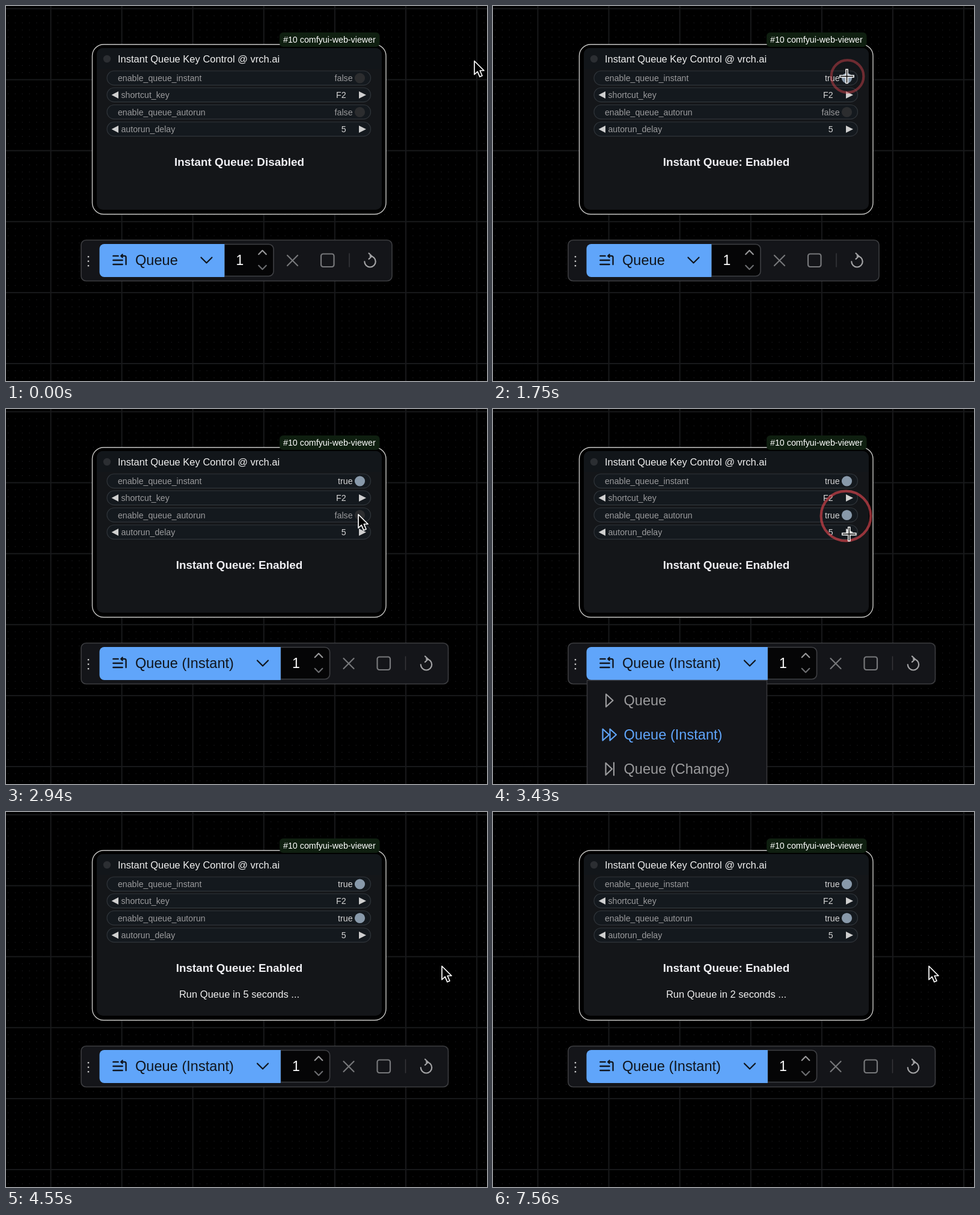
Recreate the animation shown at these times as an HTML page with a canvas. Size 800 px wide and 624 px high, loop 8000 ms.

```html
<!DOCTYPE html>
<html lang="en">
<head>
<meta charset="utf-8">
<title>Instant queue control</title>
<style>
html, body { margin: 0; width: 100%; height: 100%; overflow: hidden; background: #000; }
canvas { display: block; width: 100vw; height: 100vh; }
</style>
</head>
<body>
<canvas id="stage" width="800" height="624"></canvas>
<script>
const W = 800, H = 624, LOOP = 8000, S = 1.18;
const FONT = '"Liberation Sans", Arial, sans-serif';
const BLUE = '#60a5fa', GREY = '#9b9b9d', DIM = '#77787b', INK = '#10151d';
const ctx = document.getElementById('stage').getContext('2d');

// Timeline in ms
const CLICK_1 = 1680, CLICK_2 = 3220;
const MENU_DELAY = 100, MENU_LIFE = 460, RIPPLE = 430;
const WIDEN = CLICK_1 + MENU_LIFE;
const COUNT_START = 4130, COUNT_STEP = 1050;

// Pointer stops: time, x, y
const PATH = [
  [70, 779, 91], [1540, 588, 117], [1750, 588.5, 117], [2030, 588.5, 120],
  [2450, 588.5, 121], [2940, 586, 175], [3220, 587, 178], [3430, 592, 208],
  [4480, 725, 256]
];

const clamp = v => Math.max(0, Math.min(1, v));
const ease = p => p * p * (3 - 2 * p);
const easeOut = p => 1 - (1 - p) ** 2;

function text(str, x, y, size, color, align = 'left', weight = '') {
  ctx.font = `${weight} ${size * S}px ${FONT}`;
  ctx.textAlign = align;
  ctx.fillStyle = color;
  ctx.fillText(str, x, y);
}

function box(x, y, w, h, r, fill, stroke, width = 1.5) {
  ctx.beginPath();
  ctx.roundRect(x, y, w, h, r);
  if (fill) { ctx.fillStyle = fill; ctx.fill(); }
  if (stroke) { ctx.strokeStyle = stroke; ctx.lineWidth = width; ctx.stroke(); }
}

function disc(x, y, r, fill) {
  ctx.beginPath();
  ctx.arc(x, y, r, 0, 7);
  ctx.fillStyle = fill;
  ctx.fill();
}

function trace(points, close) {
  ctx.beginPath();
  points.forEach(([x, y]) => ctx.lineTo(x, y));
  if (close) ctx.closePath();
}

function line(points, color, width = 2.2, close = false) {
  trace(points, close);
  ctx.strokeStyle = color;
  ctx.lineWidth = width;
  ctx.stroke();
}

function chevron(x, y, rx, ry, color) {
  line([[x - rx, y - ry], [x, y + ry], [x + rx, y - ry]], color);
}

function makeGrid() {
  const cv = document.createElement('canvas');
  cv.width = W;
  cv.height = H;
  const g = cv.getContext('2d'), tile = 118.1, cell = tile / 10;
  const x0 = 74.5 - tile, y0 = 4.5 - tile;
  g.fillStyle = '#000';
  g.fillRect(0, 0, W, H);
  g.fillStyle = '#17171a';
  for (let i = 0; x0 + i * cell < W; i++) {
    for (let j = 0; y0 + j * cell < H; j++) {
      g.fillRect(x0 + i * cell - 0.7, y0 + j * cell - 0.7, 1.4, 1.4);
    }
  }
  g.fillStyle = '#18191b';
  for (let x = x0; x < W; x += tile) g.fillRect(x - 1, 0, 2, H);
  for (let y = y0; y < H; y += tile) g.fillRect(0, y - 1, W, 2);
  return cv;
}
const grid = makeGrid();

function widget(label, y, value, toggle) {
  box(168, y - 12, 438.5, 23.6, 11.8, '#14191e', '#30353a', 1.2);
  if (toggle) {
    text(label, 186, y + 5, 12, GREY);
    text(String(value), 576.5, y + 5, 12, value ? '#d6d6d6' : GREY, 'right');
    disc(588.5, y, 8.6, value ? '#8899aa' : '#2c2d2f');
    return;
  }
  text(label, 191.5, y + 5, 12, GREY);
  text(value, 565.5, y + 5, 12, '#d6d6d6', 'right');
  ctx.fillStyle = '#cfcfcf';
  trace([[187, y - 6], [175.5, y], [187, y + 6]], true);
  ctx.fill();
  trace([[587, y - 6], [599, y], [587, y + 6]], true);
  ctx.fill();
}

function node(t) {
  const instant = t >= CLICK_1, auto = t >= CLICK_2;
  box(143.5, 64, 488.5, 282.5, 19, '#000', '#c9c9c7', 1.4);
  box(151, 70, 474, 269, 10, '#141619');
  box(151, 70, 474, 35, [10, 10, 0, 0], '#12161a');
  disc(168, 88, 6.2, '#2b2e32');
  text('Instant Queue Key Control @ vrch.ai', 186, 93.5, 14, '#f0f0f0');
  box(455, 44, 166.5, 24, 6, '#0f1f10');
  text('#10 comfyui-web-viewer', 461, 61, 12.1, '#fff');

  widget('enable_queue_instant', 120, instant, true);
  widget('shortcut_key', 148, 'F2');
  widget('enable_queue_autorun', 176.5, auto, true);
  widget('autorun_delay', 205, '5');

  text('Instant Queue: ' + (instant ? 'Enabled' : 'Disabled'), 388, 266, 16, '#f0f0f4', 'center', 'bold');
  if (t >= COUNT_START) {
    const left = 5 - Math.floor((t - COUNT_START) / COUNT_STEP);
    text(`Run Queue in ${left} seconds ...`, 388, 308.5, 14, '#f0f0f0', 'center');
  }
}

function queueIcon() {
  ctx.save();
  ctx.translate(174.8, 408.8);
  ctx.scale(S, S);
  ctx.strokeStyle = INK;
  ctx.lineWidth = 2;
  ctx.stroke(new Path2D('M16 12H3M16 18H3M10 6H3M21 18V8a2 2 0 0 0-2-2h-5M16 8l-2-2 2-2'));
  ctx.restore();
}

function toolbar(wide) {
  const d = wide ? 93.5 : 0;
  box(125, 389.5, 517 + d, 68, 8, '#141519', '#3c3d40', 1.6);
  ctx.fillStyle = '#c8c8c8';
  for (let i = 0; i < 3; i++) ctx.fillRect(135.8, 416 + i * 7.5, 2.4, 2.4);

  box(363 + d, 396.5, 82, 53, [0, 8, 8, 0], '#050506', '#3f4044', 1.6);
  box(155.5, 396, 207.8 + d, 55, [8, 0, 0, 8], BLUE);
  queueIcon();
  text(wide ? 'Queue (Instant)' : 'Queue', 215, 431, 20, INK);

  ctx.save();
  ctx.translate(d, 0);
  chevron(333.5, 423, 9, 4.5, INK);
  text('1', 389, 430.5, 19.5, '#fff', 'center');
  chevron(426.5, 410, 6.3, -3.2, '#98989a');
  chevron(426.5, 435, 6.3, 3.2, '#6c6d70');
  line([[468, 415], [485, 432]], DIM);
  line([[485, 415], [468, 432]], DIM);
  box(524, 412.5, 21.5, 21.5, 3.5, null, DIM, 2.2);
  line([[571, 412], [571, 434]], '#36373b', 1.5);
  ctx.beginPath();
  ctx.arc(605.5, 425.3, 9.2, Math.PI, -Math.PI / 2, true);
  ctx.strokeStyle = '#a4a4a6';
  ctx.lineWidth = 2.2;
  ctx.stroke();
  line([[603.5, 411.5], [608.5, 416.2], [603.5, 421]], '#a4a4a6');
  ctx.restore();
}

function triangle(x, y, w, h, color) {
  line([[x, y - h], [x + w, y], [x, y + h]], color, 2.2, true);
}

function menu(t, wide) {
  const start = (t < CLICK_2 ? CLICK_1 : CLICK_2) + MENU_DELAY;
  const end = start - MENU_DELAY + MENU_LIFE;
  const alpha = Math.min(clamp((t - start) / 90), clamp((end + 90 - t) / 90));
  if (!alpha) return;
  ctx.save();
  ctx.globalAlpha = alpha;
  box(156.5, 451.5, wide ? 299 : 294.5, 190, [0, 0, 6, 6], '#141519', '#38393d', 1.5);
  const active = wide ? 1 : 0;
  ['Queue', 'Queue (Instant)', 'Queue (Change)'].forEach((label, i) => {
    const y = 485 + i * 57, color = i === active ? BLUE : GREY;
    text(label, 217.5, y + 8, 20, color);
    if (i === 0) triangle(188, y, 11.5, 10.5, color);
    if (i === 1) {
      triangle(182.5, y, 10.5, 9.5, color);
      triangle(194.5, y, 10.5, 9.5, color);
    }
    if (i === 2) {
      triangle(187.5, y, 10.5, 10, color);
      line([[201, y - 10.5], [201, y + 10.5]], color);
    }
  });
  ctx.restore();
}

function ripple(age, x, y) {
  if (age < 0 || age > RIPPLE) return;
  const p = age / 450;
  ctx.beginPath();
  ctx.arc(x, y, 17 + 34 * easeOut(p), 0, 7);
  ctx.lineWidth = p < 0.5 ? 4.2 : Math.max(1, 4.2 - (p - 0.5) * 12);
  ctx.strokeStyle = `rgba(200,65,72,${Math.min(0.38 + p * 0.75, 0.72, 1.35 - p)})`;
  ctx.stroke();
}

function pointerAt(t) {
  if (t <= PATH[0][0]) return PATH[0].slice(1);
  for (let i = 1; i < PATH.length; i++) {
    const [t0, x0, y0] = PATH[i - 1], [t1, x1, y1] = PATH[i];
    if (t > t1) continue;
    const last = i === PATH.length - 1, p = (t - t0) / (t1 - t0);
    const k = last ? easeOut(p) : ease(p);
    return [x0 + (x1 - x0) * k, y0 + (y1 - y0) * k];
  }
  return PATH[PATH.length - 1].slice(1);
}

function arrow(x, y) {
  const shape = [[0, 0], [0, 22.5], [5.2, 17.6], [9, 26.3], [13, 24.5], [9.3, 16], [16, 16]];
  ctx.save();
  ctx.translate(x, y + 0.5);
  trace(shape, true);
  ctx.fillStyle = '#000';
  ctx.fill();
  ctx.strokeStyle = '#fff';
  ctx.lineWidth = 1.7;
  ctx.stroke();
  ctx.restore();
}

function cross(x, y) {
  const arms = [[[x - 10, y], [x + 10, y]], [[x, y - 10], [x, y + 10]]];
  ctx.lineCap = 'square';
  arms.forEach(a => line(a, '#fff', 4.6));
  arms.forEach(a => line(a, '#111', 1.6));
  ctx.lineCap = 'round';
}

function draw(t) {
  const wide = t >= WIDEN;
  ctx.lineCap = ctx.lineJoin = 'round';
  ctx.drawImage(grid, 0, 0);
  node(t);
  toolbar(wide);
  menu(t, t >= CLICK_2);
  ripple(t - CLICK_1, 589.5, 117);
  ripple(t - CLICK_2, 587, 178);
  const [x, y] = pointerAt(t);
  const crossed = (t >= CLICK_1 && t < 2520) || (t >= CLICK_2 && x < 632);
  (crossed ? cross : arrow)(x, y);
}

const begin = performance.now();
function tick() {
  draw((performance.now() - begin) % LOOP);
  requestAnimationFrame(tick);
}
tick();
</script>
</body>
</html>
```
